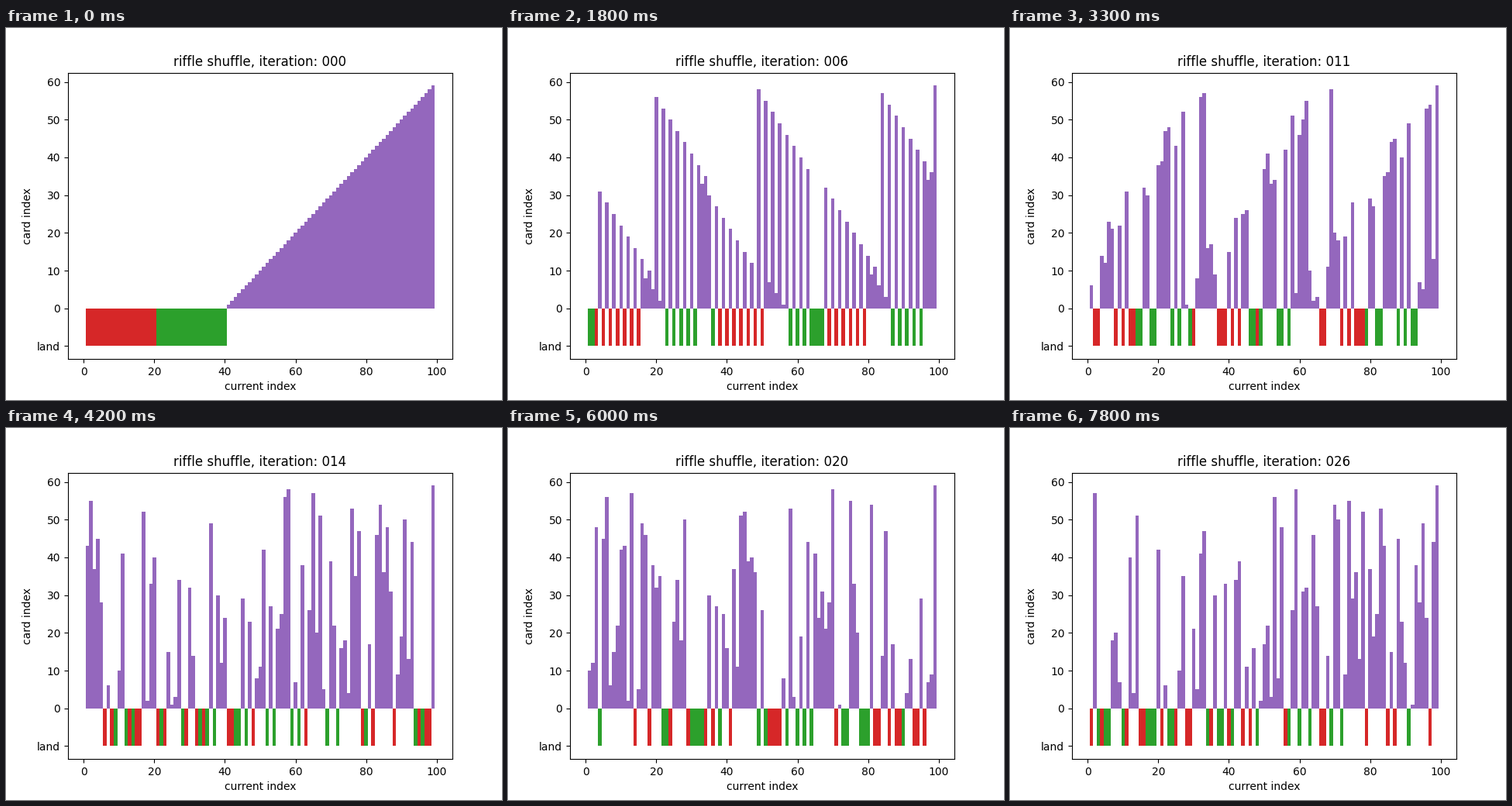
A matplotlib script for the animation above (8000 ms loop, 640 by 480 pixels).

```python
import matplotlib.pyplot as plt
from matplotlib.animation import FuncAnimation
import numpy as np

STEP_MS = 300
TICK_MS = 100
LOOP_MS = 8000
CARDS = 99
LANDS = 40

# Which half drops the first card in each riffle: T(op) or B(ottom).
FIRST_HALF = "BBTTTBTBBTBBBTTTBTBTTBBTTB"


def riffle(deck, first):
    middle = len(deck) // 2
    top, bottom = deck[:middle], deck[middle:]
    shuffled = np.empty_like(deck)
    shuffled[-1] = bottom[-1]
    start = 0 if first == "T" else 1
    shuffled[start:-1:2] = top
    shuffled[1 - start:-1:2] = bottom[:-1]
    return shuffled


def card_height(card):
    return card - LANDS if card > LANDS else -10


def card_color(card):
    if card > LANDS:
        return "tab:purple"
    return "tab:red" if card <= LANDS // 2 else "tab:green"


decks = [np.arange(1, CARDS + 1)]
for first in FIRST_HALF:
    decks.append(riffle(decks[-1], first))

fig, ax = plt.subplots(figsize=(6.4, 4.8), dpi=100)
bars = ax.bar(np.arange(1, CARDS + 1), [card_height(c) for c in decks[0]], width=1)
ax.set_xlim(-4.45, 104.45)
ax.set_ylim(-13.45, 62.45)
ax.set_xticks(range(0, 101, 20))
ax.set_yticks(range(-10, 61, 10), ["land", *range(0, 61, 10)])
ax.set_xlabel("current index")
ax.set_ylabel("card index")
title = ax.set_title("")


def update(tick):
    iteration = tick * TICK_MS // STEP_MS
    for bar, card in zip(bars, decks[iteration]):
        bar.set_height(card_height(card))
        bar.set_facecolor(card_color(card))
    title.set_text(f"riffle shuffle, iteration: {iteration:03d}")
    return [*bars, title]


anim = FuncAnimation(fig, update, frames=LOOP_MS // TICK_MS, interval=TICK_MS,
                     repeat=True, repeat_delay=0)
plt.show()
```
